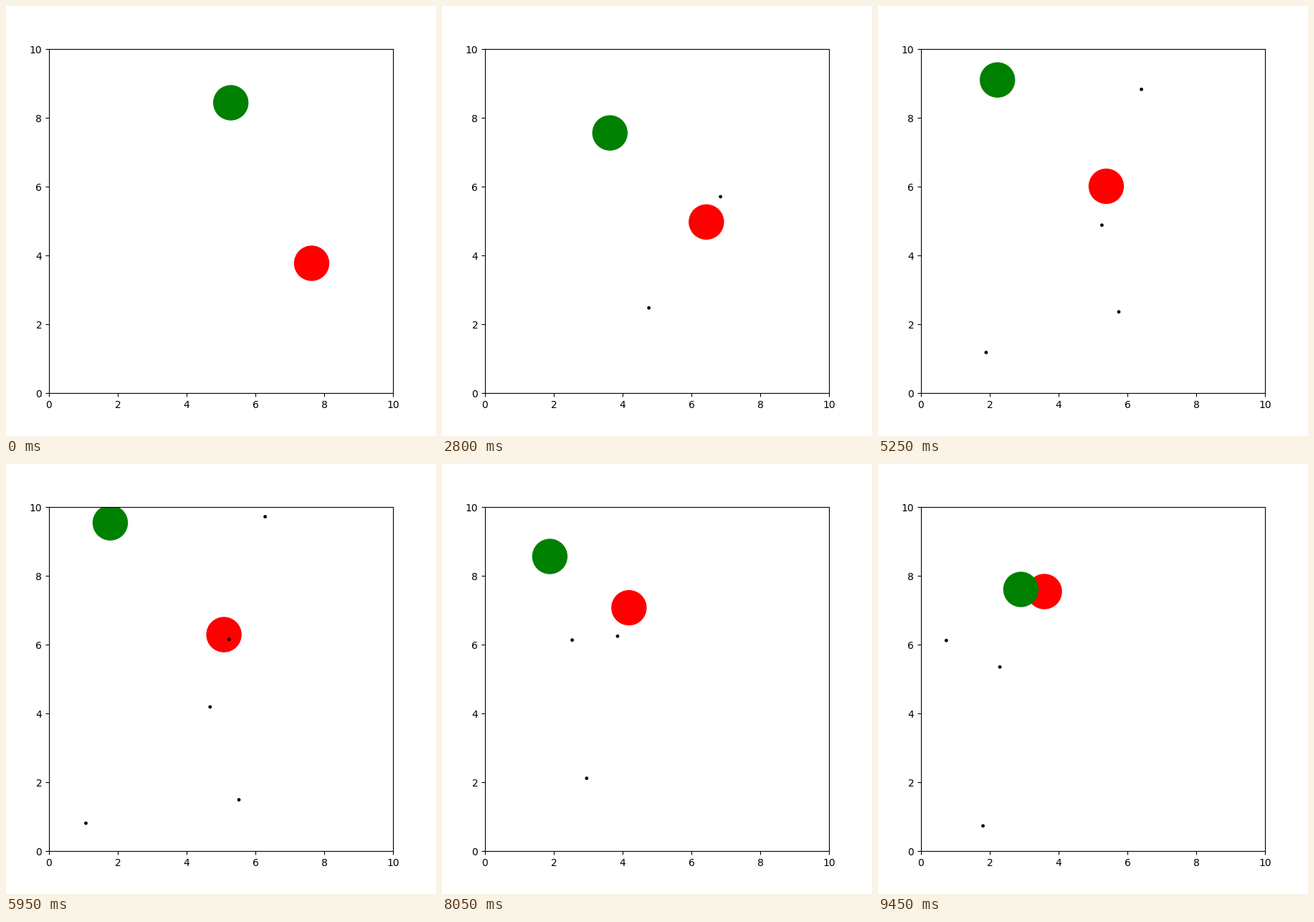
Recreate the animation shown at these times as a matplotlib script. Size 600 px wide and 600 px high, loop 9800 ms.

```python
import numpy as np
import matplotlib.pyplot as plt
from matplotlib.animation import FuncAnimation
from matplotlib.patches import Circle

FRAMES = 28
INTERVAL = 350
SPEED = 0.15
SHOT_SPEED = 3 * SPEED
SHOT_EVERY = 4
SHOT_ANGLES = np.radians([204.3, 98, 255.3, 230.2, 180.4, 209.8, 168])


def chaser_at(step):
    """Steady diagonal whose climb eases off after step 12."""
    drop = 0.00124 * max(step - 12, 0) ** 2
    return 7.635 - SPEED * step, 3.771 + SPEED * step - drop


def runner_at(step):
    """Straight legs between turning points, separately on each axis."""
    return (np.interp(step, [0, 4, 12, 20, 27], [5.285, 4.38, 2.883, 1.12, 2.904]),
            np.interp(step, [0, 6.43, 18, 27], [8.4375, 7.215, 9.76, 7.604]))


def shot_at(i, step):
    """Each shot leaves from where the chaser stood one step before."""
    fired = SHOT_EVERY * i
    x, y = chaser_at(fired)
    dist = SHOT_SPEED * (step - fired - 1)
    return x + dist * np.cos(SHOT_ANGLES[i]), y + dist * np.sin(SHOT_ANGLES[i])


fig = plt.figure(figsize=(6, 6), dpi=100)
ax = fig.add_axes([0.1, 0.1, 0.8, 0.8])
ax.set(xlim=(0, 10), ylim=(0, 10))


def disc(radius, color, zorder, lw=1):
    return ax.add_patch(Circle((0, 0), radius, color=color, lw=lw, zorder=zorder))


chaser = disc(0.5, "red", 1.0)
shots = [disc(0.05, "black", 1.1, lw=0) for _ in SHOT_ANGLES]
runner = disc(0.5, "green", 1.2)


def update(step):
    chaser.center = chaser_at(step)
    runner.center = runner_at(step)
    for i, shot in enumerate(shots):
        shot.set_visible(step > SHOT_EVERY * i)
        shot.center = shot_at(i, step)
    return [chaser, runner, *shots]


anim = FuncAnimation(fig, update, frames=FRAMES, interval=INTERVAL,
                     repeat=True, repeat_delay=0)
plt.show()
```
